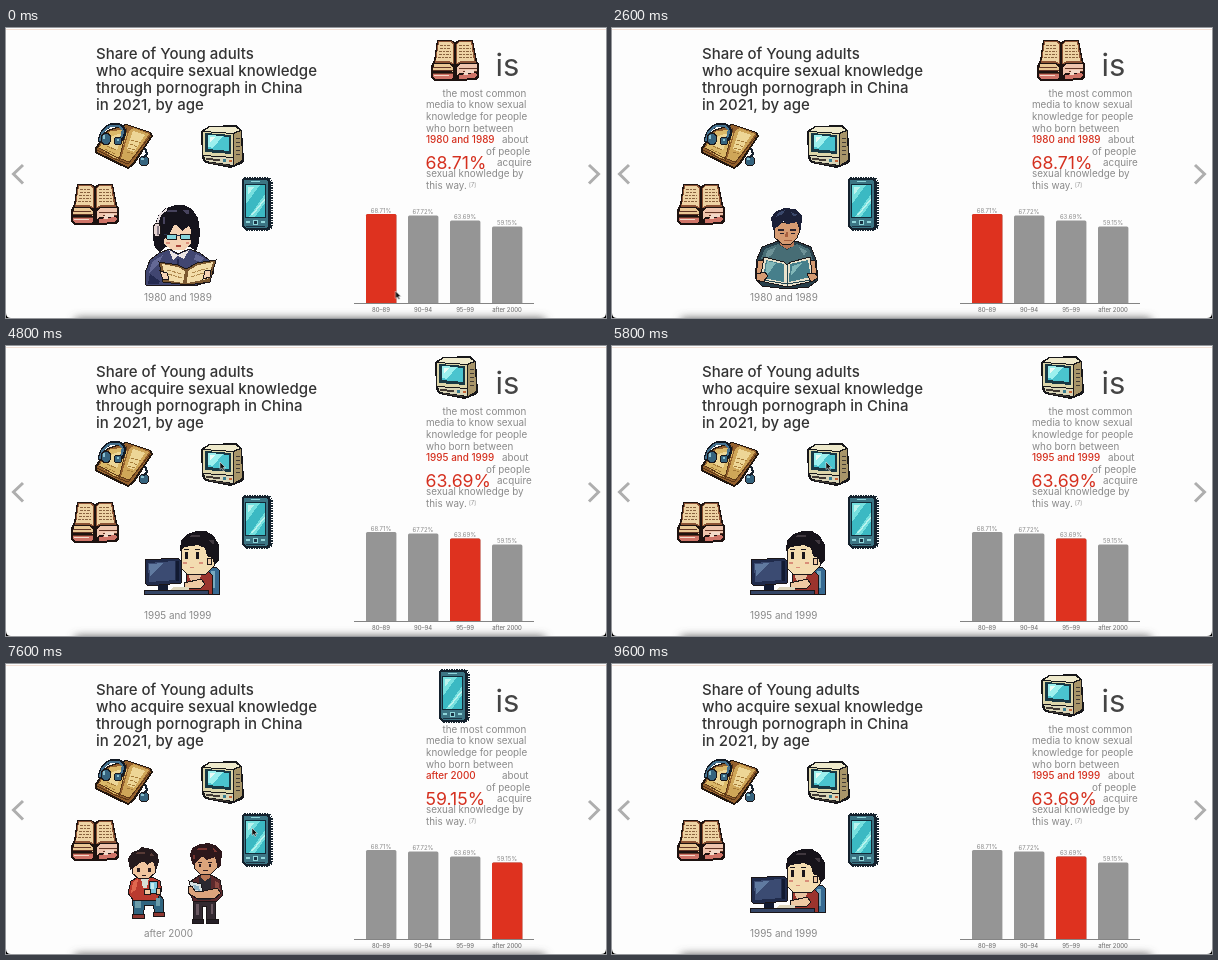
Write an HTML page that moves like this. It is 600 px wide and 290 px high and loops after 9.7 s.

```html
<!DOCTYPE html>
<html lang="en">
<head>
<meta charset="utf-8">
<title>Share by age</title>
<style>
html, body { margin: 0; width: 100%; height: 100%; overflow: hidden; background: #fdfdfd; }
svg { display: block; width: 600px; height: 290px; font-family: Inter, "Open Sans", sans-serif; }
.px { shape-rendering: crispEdges; }
.title { font-size: 15px; font-weight: 500; fill: #333; }
.body { font-size: 9.85px; fill: #8a8a8a; }
.cap { font-size: 9.9px; fill: #8a8a8a; }
.small { font-size: 6px; fill: #8a8a8a; text-anchor: middle; }
.tick { fill: #666; }
.red { fill: #d5301f; }
.era { font-size: 9.9px; font-weight: 500; }
.share { font-size: 17.7px; }
.ink { stroke: #1b1618; stroke-width: 1; }
.state, .pic { visibility: hidden; animation: 9.7s step-end infinite; }
.s0 { animation-name: s0; }
.s1 { animation-name: s1; }
.s2 { animation-name: s2; }
.s3 { animation-name: s3; }
.girl { animation-name: girl; }
.boy { animation-name: boy; }
#cursor { animation: move 9.7s ease-in-out infinite; }
@keyframes s0 { 0% { visibility: visible } 35.05%, 100% { visibility: hidden } }
@keyframes s1 { 0% { visibility: hidden } 35.05% { visibility: visible } 49.48%, 100% { visibility: hidden } }
@keyframes s2 { 0% { visibility: hidden } 49.48% { visibility: visible } 67.01% { visibility: hidden } 85.56%, 100% { visibility: visible } }
@keyframes s3 { 0% { visibility: hidden } 67.01% { visibility: visible } 85.56%, 100% { visibility: hidden } }
@keyframes girl { 0% { visibility: visible } 1.03% { visibility: hidden } 35.05% { visibility: visible } 49.48%, 100% { visibility: hidden } }
@keyframes boy { 0% { visibility: hidden } 1.03% { visibility: visible } 35.05%, 100% { visibility: hidden } }
@keyframes move {
  0%, 13.4% { transform: translate(389.5px, 263px); opacity: 1 }
  24.7%, 28.8% { transform: translate(87px, 186px); opacity: 0 }
  35.05%, 38.1% { transform: translate(112px, 112px); opacity: 1 }
  41.24%, 43.3% { transform: translate(158px, 115px) }
  49.48%, 61.8% { transform: translate(214px, 116px) }
  68.04%, 81.4% { transform: translate(246px, 164px); opacity: 1 }
  86.4%, 99.99% { transform: translate(230px, 128px); opacity: 0 }
  100% { transform: translate(389.5px, 263px); opacity: 1 }
}
</style>
</head>
<body>
<svg viewBox="0 0 600 290">
<defs>
  <filter id="blur" x="-10%" y="-200%" width="120%" height="500%"><feGaussianBlur stdDeviation="4.5"/></filter>

  <g id="book" class="px">
    <path fill="#1d1210" d="M6 1H20L24 3 28 1H42L46 22 48 25V38L45 41 27 42H3L0 39V27L3 21Z"/>
    <path fill="#8d5335" d="M7 2H20L23 5V25H4ZM28 2H41L45 25H25V5Z"/>
    <path fill="#eed3a4" d="M8 3H19L22 5V24L18 22H5ZM26 5L29 3H40L43 22H30L26 24Z"/>
    <path fill="none" stroke="#8a623e" stroke-dasharray="3 1 2 1" d="M9 6H20M9 9H20M8 12H20M8 15H20M7 18H20M28 6H39M28 9H40M28 12H40M28 15H41M28 18H41"/>
    <path fill="#e9c795" d="M3 25H18L22 28V33L19 31H2Z"/>
    <path fill="#efc4ad" d="M26 28L30 25H46V32L29 34 26 36Z"/>
    <path fill="none" stroke="#613424" d="M2 28.5H20M2 31.5H22M28 29.5H46M32 32.5H46M2 34.5H22"/>
    <path fill="#cf7468" d="M2 35H22V39L19 40H4L2 38ZM28 36L44 34 46 36 43 39 28 40Z"/>
    <path fill="#f3d9c8" d="M3 36H18V37H3ZM34 31H43V34H37V36H33Z"/>
    <path fill="none" stroke="#1d1210" d="M24 3V42M2 24.500H20M28 24.500H46"/>
  </g>

  <g id="audio" class="px">
    <path fill="#21160f" d="M0 26L12 8 31 2 56 10 58 14 39 43 33 47 18 40 0 31Z"/>
    <path fill="#94602d" d="M2 27L13 9 31 3 55 11 56 14 37 42 33 45 19 38 2 30Z"/>
    <path fill="#dbb868" d="M4 26L15 9 29 8 32 12 24 37 19 36Z"/>
    <path fill="#cfa658" d="M26 37L34 9 39 6 54 12 35 40Z"/>
    <path fill="#edd696" d="M17 14L28 11 22 28 12 23ZM38 9L50 13 39 30 32 27Z"/>
    <path fill="none" stroke="#5c3716" d="M2 28L20 37 33 42 56 13M4 26L21 35 34 40M32 6L24 38"/>
    <path fill="none" stroke="#a57a37" stroke-dasharray="3 1" d="M12 24L21 28M10 27L20 32M32 30L38 32M33 26L40 28M35 22L43 25M36 18L46 21"/>
    <path fill="none" stroke="#121923" stroke-width="4" d="M5 20C5 8 14 1 23 3C30 4 31 11 26 18"/>
    <path fill="none" stroke="#45718e" stroke-width="2" d="M5 19C6 8 14 2 23 4C28 5 29 10 26 16"/>
    <g class="ink" fill="#36647f"><ellipse cx="11" cy="17" rx="5" ry="6"/><ellipse cx="23" cy="19" rx="4" ry="4"/><ellipse cx="49" cy="39" rx="5" ry="5"/></g>
    <path fill="#8cc2d1" d="M8 13H10V17H8ZM22 17H24V19H22ZM46 36H49V38H46Z"/>
    <path fill="none" stroke="#16212d" stroke-width="2" d="M50 26L52 32 48 36"/>
  </g>

  <g id="tv" class="px">
    <path fill="#17171a" d="M0 6L8 1 35 0 41 5 43 36 40 39 30 43 4 38 1 33Z"/>
    <path fill="#eee9cb" d="M3 6L9 2H34L39 5 32 8Z"/>
    <path fill="#ddd6aa" d="M2 7L32 9V32L2 30Z"/>
    <path fill="#a89569" d="M33 9L40 6 41 35 33 40Z"/>
    <path fill="#183844" d="M4 8L30 10V29L4 27Z"/>
    <path fill="#4ac4cf" d="M7 10L28 12V26L7 24Z"/>
    <path fill="#9cf0ee" d="M7 10L22 11 12 23 7 22Z"/>
    <path fill="#e8fbf5" d="M9 12H14L9 17Z"/>
    <path fill="#d9d5b8" d="M3 31L32 33V40L5 36Z"/>
    <path fill="#413a34" d="M5 33L19 34V36L5 35ZM35 13H39V14H35ZM35 17H39V18H35ZM35 21H39V22H35ZM35 25H39V26H35ZM35 29H39V30H35ZM8 37L28 40V41L8 38Z"/>
    <path fill="#397d90" d="M22 34H25V37H22Z"/>
    <path fill="#c66436" d="M28 35H31V37H28Z"/>
  </g>

  <g id="phone" class="px">
    <path fill="none" stroke="#17252f" stroke-width="2" stroke-dasharray="2 1 1 1" d="M3 1H28L31 5V50L27 53H4"/>
    <path fill="#14212d" d="M2 1H26L30 4V50L27 53H4L1 50V3Z"/>
    <path fill="#3c7584" d="M3 3H25L27 5V50L25 51H5L3 49Z"/>
    <path fill="#122a38" d="M4 7H25V41H4Z"/>
    <path fill="#3bb9c3" d="M5 8H24V40H5Z"/>
    <path fill="#76e0df" d="M5 8H19L5 27ZM24 17V26L14 40H8Z"/>
    <path fill="#baf3ee" d="M7 10H13L7 18ZM24 21V23L12 38H10Z"/>
    <path fill="#8fd6da" d="M10 4H19V5H10ZM5 44H9V46H5ZM20 44H24V46H20ZM12 43H17V48H12Z"/>
    <path fill="#1b3546" d="M13 44H16V47H13ZM5 49H24V50H5Z"/>
  </g>

  <g id="girl" class="px">
    <path fill="#15131c" d="M11 19L15 9 22 3 31 0H40L48 4 54 13 56 26 55 38 52 46 46 42H22L16 47 11 43 9 34Z"/>
    <path fill="#f4d2b4" d="M20 20H47V39L40 45H28L20 39Z"/>
    <path fill="#15131c" d="M18 11H50V30L45 21 38 26 31 18 26 28 20 34Z"/>
    <path fill="#47435d" d="M24 5H33V7H22ZM39 5H45V9H42ZM19 12H21V19H19Z"/>
    <path class="ink" fill="#86d5dd" d="M22 29H32V34H23ZM36 29H46V34H37Z"/>
    <path fill="#27314a" d="M32 30H36V31H32ZM20 29H23V30H20Z"/>
    <path fill="#db8f7b" d="M22 37H26V39H22ZM42 37H45V39H42Z"/>
    <path fill="#a9473b" d="M32 40H37V42H32Z"/>
    <path fill="none" stroke="#e8dfe2" stroke-width="2" d="M13 19L16 10 23 4"/>
    <ellipse class="ink" fill="#e4d3d1" cx="13" cy="25" rx="4" ry="7"/>
    <path fill="#8c7f8a" d="M13 21H15V30H13Z"/>
    <path class="ink" fill="#414671" d="M2 80L1 68 6 55 15 48 26 44 34 49 45 44 56 48 65 55 70 67 64 77 50 81Z"/>
    <path fill="#646996" d="M8 57L19 50 14 60 5 68ZM52 49L60 53 56 57 50 55Z"/>
    <path fill="#ece5e4" d="M25 45L34 50 45 45 40 54 34 51 29 55Z"/>
    <path fill="#242a50" d="M6 69L16 76 15 79H4ZM33 54H35V60H33Z"/>
    <path class="ink" fill="#7c5931" d="M15 57L34 60 42 64 53 58 72 55 66 77 44 80 19 77Z"/>
    <path fill="#f2dca9" d="M18 59L34 62 41 66 39 78 22 75ZM44 66L54 60 69 57 64 74 43 78Z"/>
    <path fill="none" stroke="#b08a50" stroke-dasharray="4 1" d="M23 65L38 69M24 69L38 73M48 68L64 63M47 72L63 67"/>
    <path class="ink" fill="#f4d2b4" d="M16 66L23 68 25 74 19 75ZM61 66L67 65 66 72 59 74Z"/>
  </g>

  <g id="boy" class="px">
    <path class="ink" fill="#263e4a" d="M3 51L8 39 24 33 42 33 57 39 62 52 64 72 55 79 33 81 8 78 1 70Z"/>
    <path fill="#b77756" d="M26 28H40V38L33 41 26 37Z"/>
    <path class="ink" fill="#d69b72" d="M20 15L43 13 46 22 43 30 37 36H28L21 30Z"/>
    <path fill="#1b2038" d="M19 22L17 10 21 4 30 0 42 1 48 8 47 23 43 14 33 16 29 13 23 19Z"/>
    <path fill="#3a486b" d="M24 5L31 2 29 6 22 9ZM37 4L44 7 39 8Z"/>
    <path fill="#29202a" d="M24 21H30V23H24ZM36 21H42V23H36ZM26 25H30V26H26ZM37 25H41V26H37Z"/>
    <path fill="#a8603f" d="M32 24H34V29H31ZM30 32H38V33H30Z"/>
    <path fill="#476d75" d="M7 50L11 41 24 36 33 42 43 36 55 41 59 52 52 58H14Z"/>
    <path fill="#6d9297" d="M13 43L22 39 18 47 11 51ZM45 39L53 43 50 48Z"/>
    <path class="ink" fill="#d69b72" d="M4 53L13 51 15 63 10 71 2 67ZM53 52L61 53 63 67 56 71 51 63Z"/>
    <path class="ink" fill="#e9e2cc" d="M10 49L30 54 33 57 37 54 56 49 59 73 34 79 6 73Z"/>
    <path fill="#467f8b" d="M12 52L30 56V74L9 70ZM36 56L54 52 57 69 35 74Z"/>
    <path fill="#82b8b9" d="M13 53L22 55 14 66 11 67ZM38 58L48 55 37 68Z"/>
    <path fill="none" stroke="#234550" d="M33 57V78M9 72L33 76 57 72"/>
    <path class="ink" fill="#d69b72" d="M2 66L11 64 14 68 9 74 2 72ZM53 66L61 65 64 70 57 74Z"/>
  </g>

  <g id="desk" class="px">
    <path class="ink" fill="#376a92" d="M63 38L72 36 75 39V63H62Z"/>
    <path fill="#78aac0" d="M67 40H71V57H67Z"/>
    <path class="ink" fill="#9c342d" d="M43 42L62 38 69 45 68 63H42Z"/>
    <path fill="#e8c2a0" d="M44 43H58L55 50H47Z"/>
    <path class="ink" fill="#f3dcb0" d="M38 13H57L70 20V35L62 43H43L37 37Z"/>
    <path fill="#16131a" d="M36 20L37 9 43 3 53 0H62L70 5 75 14V29L71 34 68 27 63 25 61 17 54 14 41 16Z"/>
    <path fill="#40383f" d="M47 4H56V6H45ZM65 9H70V13H68Z"/>
    <path fill="#19151a" d="M41 21H44V28H41ZM52 21H55V28H52ZM40 18H45V19H40ZM51 18H56V19H51Z"/>
    <path fill="#d88e78" d="M39 31H43V33H39ZM55 31H59V33H55ZM46 36H50V37H46Z"/>
    <path class="ink" fill="#efc9a3" d="M63 27H67V33H63ZM40 52L57 48 61 53 57 57H40Z"/>
    <path class="ink" fill="#202b4b" d="M1 29L34 27 37 30V52L4 55 1 52Z"/>
    <path fill="#3b4b72" d="M4 32L31 30V49L5 51Z"/>
    <path fill="#607aa0" d="M5 33L20 32 6 45Z"/>
    <path fill="#121a31" d="M32 30H35V50H32ZM14 54H24V59H14Z"/>
    <path class="ink" fill="#344566" d="M0 59H64V63H0Z"/>
    <path fill="#ded6bd" d="M29 56H45V59H27Z"/>
  </g>

  <g id="pair" class="px">
    <g>
      <path class="ink" fill="#2f6580" d="M5 50L32 47 37 53 36 66H28L26 58H18L16 68H7Z"/>
      <path class="ink" fill="#ba3b2f" d="M4 34L11 30H25L33 34 35 43 30 53H6L1 46Z"/>
      <path fill="#df674e" d="M6 35L11 32 9 43 4 46ZM28 34L31 36 32 43 29 40Z"/>
      <path fill="#d8dfd5" d="M14 31H22L20 41H16Z"/>
      <path class="ink" fill="#f1c69f" d="M5 14H28V26L22 31H11L5 26Z"/>
      <path fill="#251a1d" d="M3 23L1 12 5 5 11 3 14 0 25 2 31 8 32 15 29 24 26 14 20 18 16 14 9 19Z"/>
      <path fill="#573b36" d="M11 5H18V7H8ZM24 6L27 9H23Z"/>
      <path fill="#2a1d20" d="M10 21H13V25H10ZM21 21H24V25H21ZM15 28H19V29H15Z"/>
      <path class="ink" fill="#7cc6de" d="M22 34H30V46H22Z"/>
      <path fill="#c4ecee" d="M24 36H27V42H24Z"/>
      <path class="ink" fill="#f1c69f" d="M17 42H23V47H17ZM29 41H33V47H29Z"/>
      <path fill="#6b9daa" d="M8 54H14V61H8ZM29 51H33V59H29Z"/>
      <path class="ink" fill="#8e3731" d="M5 67H17V71H5ZM26 65H37V69H26Z"/>
    </g>
    <g transform="translate(60 -4)">
      <path class="ink" fill="#332a31" d="M6 55H29L28 77H19V63H15V77H7Z"/>
      <path class="ink" fill="#5b292c" d="M4 38L13 32H24L33 37 36 52 30 58H6L3 50Z"/>
      <path fill="#2b2930" d="M12 34H24V57H10Z"/>
      <path fill="#8e4942" d="M28 38L32 40 33 50 29 52Z"/>
      <path fill="#b97755" d="M14 28H23V35L18 38 14 35Z"/>
      <path class="ink" fill="#dca47c" d="M7 13H30V25L24 31H13L7 25Z"/>
      <path fill="#2d171b" d="M6 23L3 12 5 5 13 1 22 0 30 3 35 9 34 22 31 25 28 14 20 17 15 13 10 18Z"/>
      <path fill="#77332f" d="M11 5H20V7H9ZM26 5L31 9H27ZM6 12H8V16H6Z"/>
      <path fill="#2b1a20" d="M11 19H15V20H11ZM21 19H25V20H21ZM12 21H14V24H12ZM22 21H24V24H22ZM16 27H21V28H16Z"/>
      <path class="ink" fill="#d9e2e2" d="M2 38L14 41 17 52 5 50Z"/>
      <path fill="#8fb6c8" d="M6 42L12 43 13 48 8 47Z"/>
      <path class="ink" fill="#dca47c" d="M1 44L5 43 8 48 17 48 30 45 34 50 27 56 9 55 1 50Z"/>
      <path fill="#6a5861" d="M9 61H12V72H9ZM24 61H26V71H24Z"/>
      <path class="ink" fill="#252027" d="M5 76H16V80H5ZM19 76H31V80H19Z"/>
    </g>
  </g>
</defs>

<rect width="600" height="290" fill="#fdfdfd"/>
<rect width="600" height="1" y="1" fill="#f2e0d6"/>
<rect x="68" y="290" width="472" height="12" rx="5" fill="#666" filter="url(#blur)"/>
<path d="M0 285Q0 290 5 290H0ZM600 285Q600 290 595 290H600Z"/>
<path d="M17 137L7.5 146 17 155.500M583 137L592.500 146 583 155.500" fill="none" stroke="#aeaeae" stroke-width="3"/>

<g class="title">
  <text x="90" y="30.500">Share of Young adults</text>
  <text x="90" y="47.700">who acquire sexual knowledge</text>
  <text x="90" y="65">through pornograph in China</text>
  <text x="90" y="82">in 2021, by age</text>
</g>

<use href="#audio" x="89" y="94"/>
<use href="#tv" x="195" y="97"/>
<use href="#book" x="65" y="155"/>
<use href="#phone" x="235" y="149"/>

<text x="489.500" y="47.500" font-size="31" fill="#444">is</text>
<g class="body">
  <text x="436.500" y="69">the most common</text>
  <text x="420" y="80.300">media to know sexual</text>
  <text x="420" y="92">knowledge for people</text>
  <text x="420" y="103.500">who born between</text>
  <text x="496" y="115">about</text>
  <text x="480" y="126.500">of people</text>
  <text x="491" y="138">acquire</text>
  <text x="420" y="149.300">sexual knowledge by</text>
  <text x="420" y="160.700">this way.</text>
  <text x="463" y="158.500" font-size="5.500">[7]</text>
</g>

<g id="chart"></g>
<path d="M348 275.500H528" stroke="#666" stroke-width=".8"/>
<g id="states"></g>

<use class="pic girl" href="#girl" x="138" y="177"/>
<use class="pic boy" href="#boy" x="142" y="180"/>
<use class="pic s2" href="#desk" x="138" y="185"/>
<use class="pic s3" href="#pair" x="121" y="183"/>

<g id="cursor"><path d="M0 0V7.500L1.800 6 3 8.600 4.300 8 3.200 5.500H5.500Z" fill="#111" stroke="#fff" stroke-width=".5"/></g>
</svg>
<script>
// era, axis label, share, bar top, icon, icon position
const ages = [
  ["1980 and 1989", "80–89", "68.71%", 186, "book", 425, 11],
  ["1990 and 1994", "90–94", "67.72%", 187.5, "audio", 420, 8],
  ["1995 and 1999", "95–99", "63.69%", 192.5, "tv", 429, 10],
  ["after 2000", "after 2000", "59.15%", 198.5, "phone", 432, 5]
];
const bar = (i, top, fill) =>
  `<path fill="${fill}" d="M${360 + 42 * i} 275V${top + 1.5}q0-1.5 1.5-1.5h27.4q1.5 0 1.5 1.5V275Z"/>`;

document.getElementById("chart").innerHTML = ages.map(([, label, share, top], i) =>
  bar(i, top, "#959595") +
  `<text class="small" x="${375 + 42 * i}" y="${top - 1.3}">${share}</text>` +
  `<text class="small tick" x="${375 + 42 * i}" y="284">${label}</text>`).join("");

document.getElementById("states").innerHTML = ages.map(([era, , share, top, icon, x, y], i) =>
  `<g class="state s${i}">${bar(i, top, "#de321f")}
  <use href="#${icon}" x="${x}" y="${y}"/>
  <text class="red era" x="420" y="115">${era}</text>
  <text class="red share" x="419.500" y="141">${share}</text>
  <text class="cap" x="138" y="273">${era}</text></g>`).join("");
</script>
</body>
</html>
```
